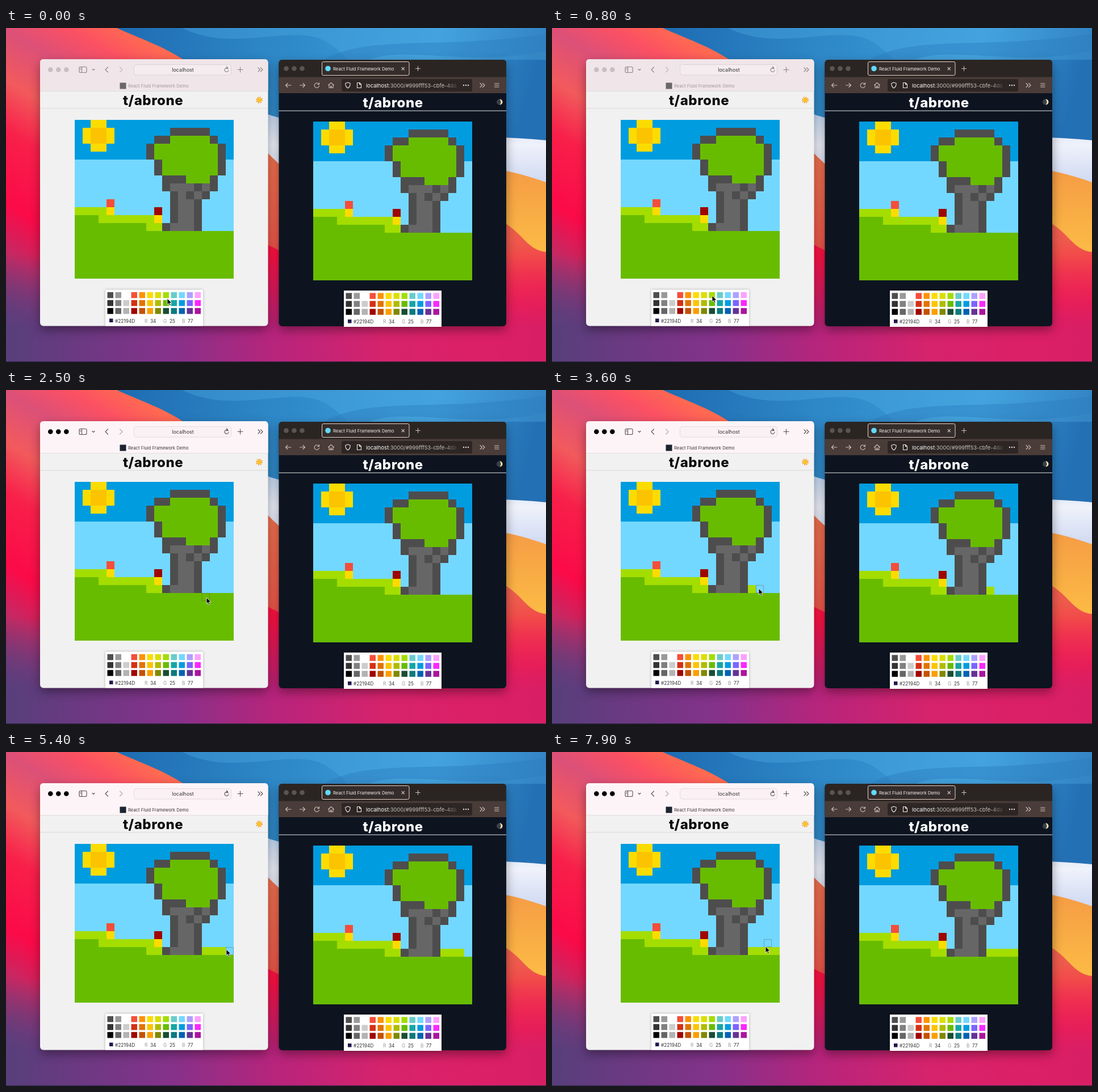
Write an HTML page that moves like this. It is 951 px wide and 589 px high and loops after 8 s.

```html
<!DOCTYPE html>
<html lang="en">
<head>
<meta charset="utf-8">
<title>Shared pixel canvas</title>
<style>
  html, body { margin: 0; width: 100%; height: 100%; overflow: hidden; }
  svg { display: block; font-family: Inter, Roboto, sans-serif; }
  .shadow { filter: drop-shadow(0 7px 9px rgba(0,0,0,.38)); }
  .title { font-size: 24px; font-weight: 800; letter-spacing: .5px; text-anchor: middle; }
  .line { fill: none; stroke-linecap: round; stroke-linejoin: round; }
  .pixels { shape-rendering: crispEdges; }
  .bar { fill: #f0e5e9; }
  .field { fill: #f5ecef; stroke: #ddd2d6; }
  .tools { stroke: #8b8487; }
  .tab { fill: #a39a9e; }
  .logo { fill: #6b6769; }
  .light { fill: #c9bfc3; }
  .active .bar { fill: #fdf4f7; }
  .active .field { fill: #fbf1f4; stroke: #e6dade; }
  .active .tools { stroke: #57504f; }
  .active .tab { fill: #3b3638; }
  .active .logo { fill: #1b2430; }
  .active .light { fill: var(--on); }
</style>
</head>
<body>
<svg id="stage" width="951" height="589" viewBox="0 0 951 589">
  <defs>
    <linearGradient id="warm" gradientUnits="userSpaceOnUse" x1="300" y1="0" x2="0" y2="500">
      <stop offset=".08" stop-color="#ff6a50"/><stop offset=".17" stop-color="#fb5063"/>
      <stop offset=".27" stop-color="#dc5078"/><stop offset=".4" stop-color="#f25a5c"/>
      <stop offset=".53" stop-color="#f8204a"/><stop offset=".72" stop-color="#fb0a48"/>
      <stop offset=".85" stop-color="#c22a64"/><stop offset="1" stop-color="#7c3a7a"/>
    </linearGradient>
    <linearGradient id="blue" gradientUnits="userSpaceOnUse" x1="200" y1="0" x2="900" y2="190">
      <stop offset="0" stop-color="#1e6cb2"/><stop offset=".35" stop-color="#2d86c6"/>
      <stop offset=".75" stop-color="#3d9edb"/><stop offset="1" stop-color="#2470b4"/>
    </linearGradient>
    <linearGradient id="pale" x2="0" y2="1">
      <stop offset="0" stop-color="#b9d2f0"/><stop offset=".5" stop-color="#f0f2fb"/><stop offset="1" stop-color="#cfd9f2"/>
    </linearGradient>
    <linearGradient id="gold" x2="0" y2="1">
      <stop offset="0" stop-color="#f59a45"/><stop offset="1" stop-color="#fcbb45"/>
    </linearGradient>
    <linearGradient id="coral" gradientUnits="userSpaceOnUse" x1="0" y1="230" x2="0" y2="589">
      <stop offset="0" stop-color="#f0714f"/><stop offset=".4" stop-color="#ee5a4c"/>
      <stop offset=".72" stop-color="#ff1d45"/><stop offset="1" stop-color="#d81c68"/>
    </linearGradient>
    <linearGradient id="floor">
      <stop offset="0" stop-color="#573f7b"/><stop offset=".3" stop-color="#84328a"/>
      <stop offset=".5" stop-color="#b8247c"/><stop offset=".7" stop-color="#d6236c"/>
      <stop offset=".9" stop-color="#dc1f66"/><stop offset="1" stop-color="#d81f64"/>
    </linearGradient>
    <linearGradient id="fade" gradientUnits="userSpaceOnUse" x1="0" y1="400" x2="0" y2="530">
      <stop offset="0" stop-color="#000"/><stop offset="1" stop-color="#fff"/>
    </linearGradient>
    <mask id="lower"><rect y="400" width="951" height="189" fill="url(#fade)"/></mask>
    <linearGradient id="urlEnd">
      <stop offset="0" stop-color="#2d2624" stop-opacity="0"/><stop offset="1" stop-color="#2d2624"/>
    </linearGradient>

    <g id="art" class="pixels" transform="scale(14)">
      <path fill="#73d8ff" d="M0 0h20v20H0z"/>
      <path fill="#009ce0" d="M0 0h20v5H0z"/>
      <path fill="#68bc00" d="M0 12h3v1h6v1h11v6H0z"/>
      <path fill="#a4dd00" d="M0 11h4v1h6v1h1v1h-2v-1h-6v-1h-3z"/>
      <path fill="#fcdc00" d="M1 1h1v-1h2v1h1v2h-1v1h-2v-1h-1zM4 11h1v1h-1zM10 12h1v1h-1z"/>
      <path fill="#fcc400" d="M2 1h2v2h-2z"/>
      <path fill="#f44e3b" d="M4 10h1v1h-1z"/>
      <path fill="#9f0500" d="M10 11h1v1h-1z"/>
      <path fill="#4d4d4d" d="M12 1h5v1h1v1h1v4h-1v2h-1v1h-1v4h-5v-1h1v-4h-1v-2h-1v-2h-1v-2h1v-1h2z"/>
      <path fill="#68bc00" d="M12 2h5v1h1v4h-1v1h-3v-1h-3v-2h-1v-2h2z"/>
      <path fill="#666" d="M12 8h3v1h-1v1h1v4h-3v-1h1v-4h-1zM16 8h1v1h-1zM15 9h1v1h-1z"/>
      <rect id="tuft" x="16" y="13" width="0" height="1" fill="#a4dd00"/>
    </g>

    <g id="picker">
      <rect class="shadow" style="filter:drop-shadow(0 0 2px #0004)" width="172" height="64" fill="#fff"/>
      <g id="swatches"></g>
      <path fill="#22194d" d="M7 51h6.5v6.5H7z"/>
      <g font-size="8.3" fill="#333">
        <text x="17" y="58">#22194D</text>
        <text x="79" y="58">34</text><text x="113" y="58">25</text><text x="145" y="58">77</text>
        <g fill="#999"><text x="69" y="58">R</text><text x="102" y="58">G</text><text x="135" y="58">B</text></g>
      </g>
    </g>
  </defs>

  <!-- desktop -->
  <rect width="951" height="589" fill="url(#warm)"/>
  <path fill="url(#coral)" d="M440 200H951V589H440z"/>
  <path fill="#ff1244" d="M440 372Q465 384 500 402V589H440z"/>
  <path fill="url(#gold)" d="M840 240Q900 256 951 270V395C915 391 910 358 870 340z"/>
  <path fill="url(#pale)" d="M440 140L951 185V272Q900 254 850 246L500 258Q470 230 440 200z"/>
  <path fill="url(#blue)" d="M195 0C240 20 275 32 308 53C370 92 410 140 480 158C640 195 800 185 951 198V0z"/>
  <path fill="#52ade2" opacity=".35" d="M310 0C400 45 500 -8 560 22Q590 40 600 56H951V0z"/>
  <path fill="#2a7dbf" opacity=".45" d="M560 56C640 10 760 40 951 10V40C820 70 700 30 640 56z"/>
  <rect width="951" height="589" fill="url(#floor)" mask="url(#lower)"/>
  <path fill="#272544" d="M0 588h951v1H0z"/>

  <!-- light window -->
  <rect class="shadow" x="60" y="55" width="401.5" height="470.5" rx="6" fill="#f1f1f1"/>
  <path class="bar" d="M60 111V61q0-6 6-6h389.500q6 0 6 6v50z"/>
  <path fill="#dcd6d8" d="M60 111h401.500v.8H60zM60 141.300h401.500v.9H60z"/>
  <g class="light">
    <circle cx="78.300" cy="73.500" r="4.300" style="--on:#fe5a52"/>
    <circle cx="92.300" cy="73.500" r="4.300" style="--on:#f6bd32"/>
    <circle cx="106.300" cy="73.500" r="4.300" style="--on:#2bc840"/>
  </g>
  <rect class="field" x="225.500" y="64.500" width="171" height="18.500" rx="4"/>
  <g class="line tools" stroke-width="1.100">
    <rect x="129" y="68.500" width="13" height="10" rx="2"/>
    <path d="M133.500 68.500v10M130.800 71h1M130.800 73h1M152 72.500l2 2 2-2M179.500 69l-4.500 4.500 4.500 4.500M412.500 69v9M408 73.500h9M444 70l3.500 3.500-3.500 3.500M448.500 70l3.500 3.500-3.500 3.500M391.500 72a3.500 3.500 0 1 0 .5 2.500M388.500 68l2 2-2 2"/>
    <path opacity=".45" d="M200.500 69l4.500 4.500-4.500 4.500"/>
  </g>
  <text x="311.500" y="77" font-size="9" text-anchor="middle" fill="#333">localhost</text>
  <rect class="logo" x="200.500" y="96.500" width="11" height="11"/>
  <text class="tab" x="215" y="105" font-size="7.700">React Fluid Framework Demo</text>
  <text class="title" x="259" y="136" fill="#0b0b0b">t/abrone</text>
  <circle cx="446" cy="127" r="4.800" fill="none" stroke="#f09a2c" stroke-width="2.200" stroke-dasharray="1.900 1.870"/>
  <circle cx="446" cy="127" r="3.900" fill="#fbc02d"/>
  <use href="#art" x="0" transform="translate(121 162)"/>
  <use href="#picker" transform="translate(175 461.500)"/>

  <!-- dark window -->
  <rect class="shadow" x="480.500" y="56" width="400.500" height="470" rx="6" fill="#0d1420"/>
  <path fill="#2a2523" d="M480.500 87V62q0-6 6-6H875q6 0 6 6v25z"/>
  <path fill="#4a3c38" d="M480.500 86.500H881V115H480.500z"/>
  <path fill="#e9e9ea" d="M480.500 145.500H881v1.100H480.500z"/>
  <g fill="#5a5553"><circle cx="493.500" cy="71.500" r="4.300"/><circle cx="507.500" cy="71.500" r="4.300"/><circle cx="521.500" cy="71.500" r="4.300"/></g>
  <rect x="556.500" y="59.500" width="153.500" height="24" rx="2.500" fill="#352d2b" stroke="#eed3c8"/>
  <circle cx="567" cy="71.500" r="4.800" fill="#61dafb"/>
  <text x="576" y="75" font-size="7.750" fill="#f5efec">React Fluid Framework Demo</text>
  <rect x="591" y="90" width="230" height="22" rx="3" fill="#2d2624"/>
  <text x="634" y="104.500" font-size="9.400" fill="#cbc2be"><tspan fill="#fff">localhost</tspan>:3000/#999fff53-cbfe-4da</text>
  <path fill="url(#urlEnd)" d="M772 92h26v18h-26z"/>
  <path fill="#2d2624" d="M798 92h20v18h-20z"/>
  <g fill="#e6dedb"><circle cx="806" cy="101" r="1.200"/><circle cx="810" cy="101" r="1.200"/><circle cx="814" cy="101" r="1.200"/></g>
  <g class="line" stroke="#c9bdb8" stroke-width="1.100">
    <path d="M697 69.500l4.500 4.500M701.500 69.500l-4.500 4.500M725.500 67.500v8M721.500 71.500h8M502 101h-9.500M496 97.500l-3.500 3.500 3.500 3.500M517.500 101h9M523 97.500l3.500 3.500-3.500 3.500M551 99a4.200 4.200 0 1 0 .5 3M551.500 96.500v3h-3M567.500 101l5-4.500 5 4.500M569 100.500v5h7v-5M571.500 105.500v-3h2v3M835 97.500l3.500 3.500-3.500 3.500M839.500 97.500l3.500 3.500-3.500 3.500M860.500 98h7.500M860.500 101h7.500M860.500 104h7.500"/>
    <path stroke="#f0e8e5" d="M602 96l4.200 1.500q.3 6-4.200 8.500-4.500-2.500-4.200-8.500zM618.500 96.500h4l3 3v6h-7zM622.500 96.500v3h3"/>
  </g>
  <text class="title" x="681.500" y="140" fill="#fff">t/abrone</text>
  <circle cx="869" cy="130.500" r="5" fill="#3a4049"/>
  <path fill="#f0e2b0" d="M869.500 125.500a5 5 0 0 1 0 10q4-5 0-10z"/>
  <use href="#art" transform="translate(541 165)"/>
  <use href="#picker" transform="translate(595 463)"/>

  <!-- pointer -->
  <rect id="hover" class="pixels" width="13" height="13" fill="none" stroke="#555" stroke-opacity=".4"/>
  <g id="pointer">
    <path id="arrow" fill="#000" stroke="#fff" stroke-width=".8" d="M0 0v11l2.600-2.400 1.700 4 1.900-.8-1.700-3.900h3.600z"/>
    <path id="hand" fill="#fff" stroke="#111" stroke-width=".9" stroke-linejoin="round" d="M-1 .8q1-1.200 2 0v4l1-.6 1 .8 1-.5 1 .9 1-.3q.7.400.6 1.200l-.6 3.200-1 2.300H.2L-1.500 9l-2.500-3q.2-1.400 1.500-.8l1.500 1.200z"/>
  </g>
</svg>
<script>
const LOOP = 8000, STEP = 100, CELL = 14, ART = { x: 121, y: 162 };
const ACTIVATE = 1300;
const paints = [2900, 3900, 4500, 5700];
// time, x, y
const route = [
  [0, 284, 477], [800, 282, 472], [1500, 282, 472], [2300, 353, 366], [2500, 353, 366],
  [2800, 352, 351], [3200, 352, 350], [3600, 364, 350], [4000, 365, 350], [4400, 378, 349],
  [4900, 379, 349], [5400, 388, 348], [5800, 390, 348], [6400, 246, 474], [7000, 246, 474],
  [7700, 375, 344], [7900, 376, 343], [LOOP, 376, 343]
];
const palette = `4d4d4d 999999 ffffff f44e3b fe9200 fcdc00 dbdf00 a4dd00 68ccca 73d8ff aea1ff fda1ff
  333333 808080 cccccc d33115 e27300 fcc400 b0bc00 68bc00 16a5a5 009ce0 7b64ff fa28ff
  000000 666666 b3b3b3 9f0500 c45100 fb9e00 808900 194d33 0c797d 0062b1 653294 ab149e`.split(/\s+/);

const el = id => document.getElementById(id);
const show = (id, on) => el(id).setAttribute('visibility', on ? 'visible' : 'hidden');

el('swatches').innerHTML = palette.map((color, i) =>
  `<rect x="${3.5 + i % 12 * 14}" y="${4.3 + Math.floor(i / 12) * 14}" width="10.5" height="10.5" fill="#${color}"/>`).join('');

function pointerAt(t) {
  const i = route.findIndex(stop => stop[0] > t);
  const [t0, x0, y0] = route[i - 1], [t1, x1, y1] = route[i];
  const p = (t - t0) / (t1 - t0), ease = p * p * (3 - 2 * p);
  return [x0 + (x1 - x0) * ease, y0 + (y1 - y0) * ease];
}

function draw(now) {
  const t = Math.floor(now % LOOP / STEP) * STEP;
  const [x, y] = pointerAt(t), active = t >= ACTIVATE;
  const col = Math.floor((x - ART.x) / CELL), row = Math.floor((y - ART.y) / CELL);
  const overArt = col >= 0 && col < 20 && row >= 0 && row < 20;
  const overPicker = active && y > 465;

  el('stage').classList.toggle('active', active);
  el('tuft').setAttribute('width', paints.filter(time => t >= time).length);
  el('hover').setAttribute('x', ART.x + col * CELL + .5);
  el('hover').setAttribute('y', ART.y + row * CELL + .5);
  el('pointer').setAttribute('transform', `translate(${x} ${y})`);
  show('hover', active && overArt);
  show('arrow', !overPicker);
  show('hand', overPicker);
  requestAnimationFrame(draw);
}
requestAnimationFrame(draw);
</script>
</body>
</html>
```
